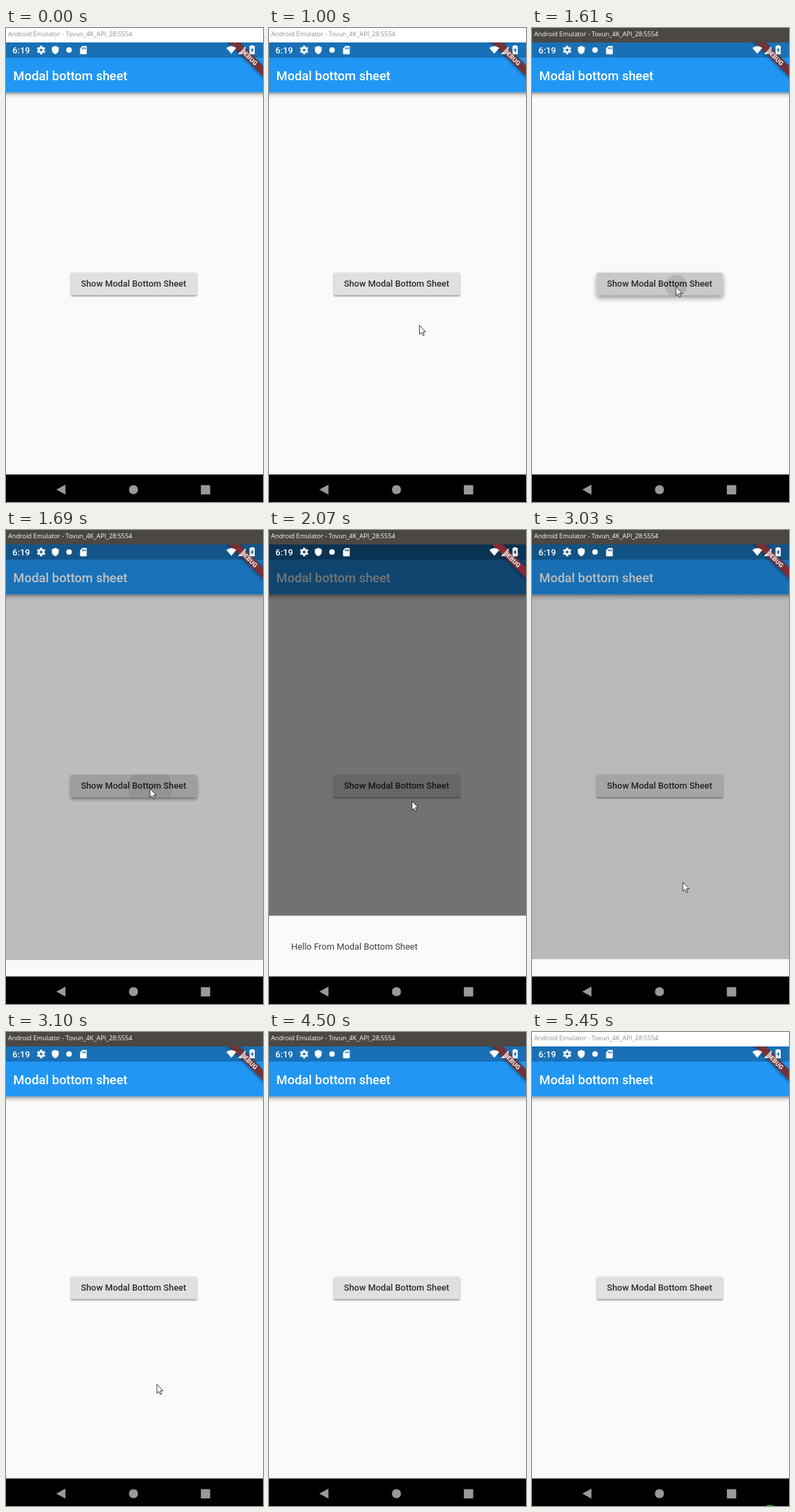
Write an HTML page that moves like this. It is 373 by 689 pixels and loops after 5600 ms.

```html
<!DOCTYPE html>
<html lang="en">
<head>
<meta charset="utf-8">
<title>Modal bottom sheet</title>
<style>
html, body { margin: 0; width: 100%; height: 100%; overflow: hidden; background: #fafafa; }
svg { display: block; width: 100vw; height: 100vh; font-family: Roboto, sans-serif; }
.medium { font-weight: 500; }
</style>
</head>
<body>
<svg viewBox="0 0 373 689">
  <defs>
    <linearGradient id="fade" x2="0" y2="1">
      <stop offset="0" stop-color="#000" stop-opacity=".4"/>
      <stop offset=".4" stop-color="#000" stop-opacity=".14"/>
      <stop offset="1" stop-color="#000" stop-opacity="0"/>
    </linearGradient>
    <filter id="blur" x="-20%" y="-60%" width="140%" height="220%">
      <feGaussianBlur id="blurSize" stdDeviation="1"/>
    </filter>
    <filter id="soft" x="-20%" y="-60%" width="140%" height="220%">
      <feGaussianBlur stdDeviation="2"/>
    </filter>
    <clipPath id="buttonClip"><rect x="94" y="355.5" width="183" height="33" rx="2"/></clipPath>
    <clipPath id="appClip"><rect y="21" width="373" height="629"/></clipPath>
  </defs>

  <rect width="373" height="689" fill="#fafafa"/>

  <g clip-path="url(#appClip)">
    <rect y="93.6" width="373" height="8.4" fill="url(#fade)"/>
    <rect y="43" width="373" height="50.6" fill="#2196f3"/>
    <rect y="21" width="373" height="22" fill="#1970b6"/>
    <text class="medium" x="10.6" y="76" font-size="18.4" fill="#fff">Modal bottom sheet</text>

    <rect id="shadow" x="94" y="355.5" width="183" height="33" rx="2" filter="url(#blur)"/>
    <rect x="94" y="355.5" width="183" height="33" rx="2" fill="#e0e0e0"/>
    <g clip-path="url(#buttonClip)">
      <rect id="highlight" x="94" y="355.5" width="183" height="33"/>
      <circle id="splash" cx="209" cy="375"/>
    </g>
    <text class="medium" x="108.7" y="376.4" font-size="12.87" fill="#000" fill-opacity=".8">Show Modal Bottom Sheet</text>

    <rect id="scrim" y="21" width="373" height="629"/>
    <g id="sheet">
      <rect width="373" height="92" fill="#fafafa"/>
      <text x="32.3" y="49.2" font-size="12.9" fill="#000" fill-opacity=".75">Hello From Modal Bottom Sheet</text>
    </g>

    <g transform="translate(353 42.5) rotate(45)">
      <rect x="-45" y="-5" width="90" height="12" opacity=".4" filter="url(#soft)"/>
      <rect id="ribbon" x="-45" y="-5.5" width="90" height="11"/>
    </g>
  </g>

  <g fill="#fff">
    <text class="medium" x="9.3" y="37" font-size="13">6:19</text>
    <g transform="translate(51 32)">
      <g id="gear"></g>
      <circle r="3.2" fill="none" stroke="#fff" stroke-width="2.6"/>
    </g>
    <path d="M71.5 26 76.5 28V31.5Q76.5 36.3 71.5 38.3 66.5 36.3 66.5 31.5V28Z"/>
    <circle cx="91.5" cy="32" r="4"/>
    <path fill-rule="evenodd" d="M111 26H116.2Q117.2 26 117.2 27V37.3Q117.2 38.3 116.2 38.3H108.5Q107.5 38.3 107.5 37.3V29.5ZM110.5 28.3V31H111.7V28.3ZM112.7 28.3V31H113.9V28.3ZM114.9 28.3V31H116V28.3Z"/>
    <path d="M319.8 29Q327 23.3 334.2 29L327 37.5Z"/>
    <path d="M347.5 26.5V38H336.5Z"/>
    <path fill-rule="evenodd" d="M355.5 26V25H359V26H361V38.3H353.5V26ZM357.9 28 355 33H356.8V36.5L359.6 31.3H357.9Z"/>
  </g>
  <text transform="translate(353 42.5) rotate(45)" y="3.3" font-size="9.25" font-weight="900" fill="#eee6e6" stroke="#63383e" stroke-width="1" paint-order="stroke" text-anchor="middle">DEBUG</text>

  <rect y="649" width="373" height="40"/>
  <g fill="#999">
    <path d="M73 671 86.3 663.8V678.3Z"/>
    <circle cx="185" cy="671" r="6.6"/>
    <rect x="282.8" y="664.4" width="13.6" height="13.6" rx="1"/>
  </g>
  <rect id="sliver" x="341" y="688" width="9" height="1" fill="#4fd048"/>

  <rect id="bar" width="373" height="21"/>
  <text id="barText" x="3" y="12.3" font-size="9.2" style="font-family:'Open Sans','Noto Sans',sans-serif">Android Emulator - Tovun_4K_API_28:5554</text>

  <circle id="click" r="10" fill="#ff0" fill-opacity=".47"/>
  <path id="cursor" d="M0 0V13.2L3 10.4 5 15 7 14.1 5 9.6H9Z" fill="#fff" stroke="#222" stroke-width=".9" stroke-linejoin="round"/>
</svg>
<script>
const LOOP = 5600;
const STEP = 77;
const $ = id => document.getElementById(id);
const set = (id, attrs) => {
  for (const key in attrs) $(id).setAttribute(key, attrs[key]);
};
const show = (id, on) => set(id, { visibility: on ? "visible" : "hidden" });
const clamp = x => Math.min(1, Math.max(0, x));
const mix = (a, b, k) => a + (b - a) * k;
const ramp = (t, from, to) => clamp((t - from) / (to - from));

const captured = (t, from) => from + Math.floor((t - from) / STEP + .15) * STEP;

// Bezier curve through any number of control points.
function curve(points, k) {
  if (points.length === 1) return points[0];
  const next = points.slice(1).map((p, i) => p.map((v, axis) => mix(points[i][axis], v, k)));
  return curve(next, k);
}

// The pointer rests at the end of a move until it is hidden or moves again.
const moves = [
  { start: 590, end: 1140, hide: 2070, path: [[177, 655], [238, 450], [209, 376]] },
  { start: 2070, end: 2770, hide: 3330, path: [[207.5, 394], [175, 720], [178, 617], [219, 512]] },
  { start: 3330, end: 3560, hide: 3640, path: [[214, 530], [188, 580], [233, 658]] },
  { start: 3960, end: 4110, hide: 4430, path: [[292, 680], [287, 671]] },
  { start: 4430, end: 4500, hide: 4500, path: [[287, 680]] }
];

function pointerAt(t) {
  const move = moves.find(m => t >= m.start && t < m.hide);
  return move && curve(move.path, ramp(captured(t, move.start), move.start, move.end));
}

function sheetAt(t) {
  return t < 2940
    ? ramp(captured(t, 1540), 1640, 1840)
    : 1 - ramp(captured(t, 2940), 2874, 3074);
}

// CSS "ease": cubic-bezier(.25, .1, .25, 1)
function ease(x) {
  const points = [[0, 0], [.25, .1], [.25, 1], [1, 1]];
  let lo = 0, hi = 1;
  for (let i = 0; i < 16; i++) {
    const mid = (lo + hi) / 2;
    if (curve(points, mid)[0] < x) lo = mid; else hi = mid;
  }
  return curve(points, hi)[1];
}

function drawWindow(t) {
  const active = t >= 1310 && t < 5450;
  set("bar", { fill: active ? "#4a4744" : "#fff" });
  set("barText", { fill: active ? "#fff" : "#8e8e8e" });
  show("sliver", t >= 5450);
}

function drawButton(t) {
  const now = captured(t, 1540);
  const pressed = ramp(now, 1310, 1610) * (1 - ramp(now, 1617, 1840));
  set("shadow", { transform: `translate(0 ${mix(1.4, 4, pressed)})`, opacity: mix(.42, .4, pressed) });
  set("blurSize", { stdDeviation: mix(1, 3.6, pressed) });
  set("highlight", { opacity: .1 * pressed });
  set("splash", { r: 16 * 2 ** ((now - 1617) / STEP), opacity: .11 * pressed });
}

function drawSheet(t) {
  const open = sheetAt(t), dim = ease(open);
  set("scrim", { opacity: .54 * dim });
  set("sheet", { transform: `translate(0 ${649 - 88.4 * open})` });
  show("sheet", open > 0);
  const tint = [[112, 136], [52, 40], [56, 52]].map(([a, b]) => Math.round(mix(a, b, dim)));
  set("ribbon", { fill: `rgb(${tint})` });
}

function drawPointer(t) {
  const spot = pointerAt(t);
  show("cursor", spot);
  show("click", t >= 1310 && t < 1540 || t >= 2770 && t < 3020);
  if (!spot) return;
  const [x, y] = spot;
  set("cursor", { transform: `translate(${x} ${y})` });
  set("click", { cx: x, cy: y });
}

function draw(t) {
  drawWindow(t);
  drawButton(t);
  drawSheet(t);
  drawPointer(t);
}

$("gear").innerHTML = Array.from({ length: 6 }, (_, i) =>
  `<rect x="-1.6" y="-6.3" width="3.2" height="3" rx=".5" transform="rotate(${i * 60})"/>`).join("");

const start = performance.now();
function tick() {
  draw((performance.now() - start) % LOOP);
  requestAnimationFrame(tick);
}
tick();
</script>
</body>
</html>
```
